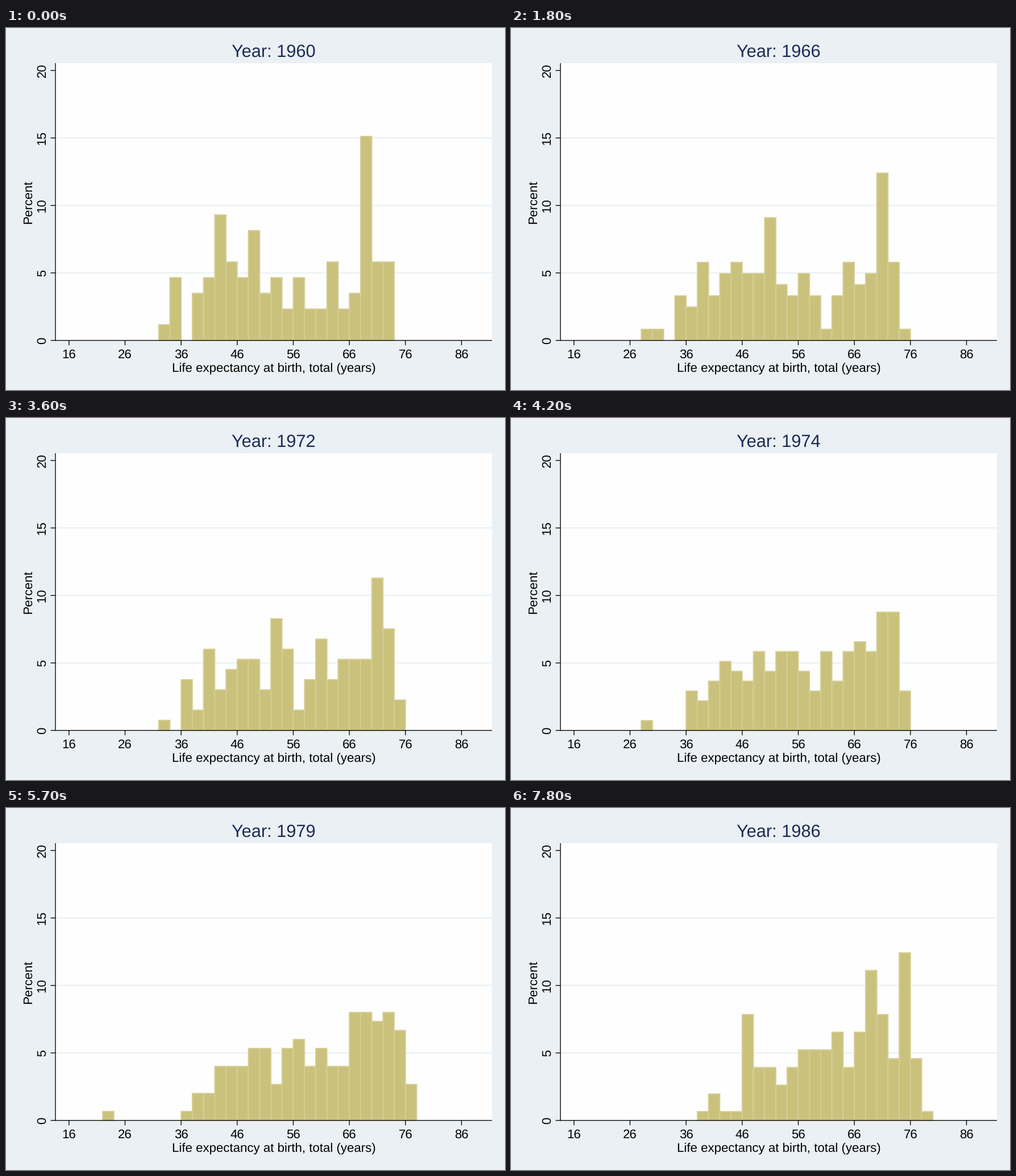
Animation, 878 px wide and 638 px high, one loop 8 s. Source, as a matplotlib script:

```python
import numpy as np
import matplotlib.pyplot as plt
from matplotlib.animation import FuncAnimation
from matplotlib.patches import Rectangle

WIDTH, HEIGHT, DPI = 878, 638, 64  # a power of two keeps the pixel size exact
PT = 72 / DPI
INTERVAL, FRAMES, FRAMES_PER_YEAR = 100, 80, 3
LEFT, RIGHT, TOP, BASE = 87, 855, 62, 550.6
BG, INK, NAVY = "#eaf0f3", "#000000", "#1c2b56"
KHAKI, KHAKI_EDGE = "#cac27c", "#d5cf97"
BINS = np.arange(18, 80, 2)

plt.rcParams["font.family"] = "Liberation Sans"
plt.rcParams["text.hinting"] = "none"


def x_of(age):
    return 110.8 + 9.867 * (age - 16)


def y_of(percent):
    return BASE - 23.79 * percent


def counts_from(first_age, *counts):
    """Number of countries per two-year bin, starting at first_age."""
    row = np.zeros(len(BINS))
    start = (first_age - BINS[0]) // 2
    row[start:start + len(counts)] = counts
    return row


surveys = {}
surveys[1960] = counts_from(32, 1, 4, 0, 3, 4, 8, 5, 4, 7, 3, 4, 2, 4, 2, 2,
                            5, 2, 3, 13, 5, 5)
surveys[1963] = counts_from(28, 1, 1, 1, 5, 2, 6, 5, 7, 6, 8, 7, 6, 3, 5, 1,
                            4, 3, 3, 8, 1, 12, 10, 5)
surveys[1966] = counts_from(28, 1, 1, 0, 4, 3, 7, 4, 6, 7, 6, 6, 11, 5, 4, 6,
                            4, 1, 4, 7, 5, 6, 15, 7, 1)
surveys[1972] = counts_from(36, 5, 2, 8, 4, 6, 7, 7, 4, 11, 8, 2, 5, 9, 5, 7,
                            7, 7, 15, 10, 3)
surveys[1976] = counts_from(36, 2, 4, 2, 10, 6, 3, 9, 8, 4, 8, 11, 4, 7, 5, 8,
                            11, 9, 10, 15, 5, 1)
surveys[1982] = counts_from(38, 2, 4, 3, 5, 8, 6, 8, 3, 9, 7, 9, 10, 7, 4, 12,
                            15, 12, 10, 14, 6)
surveys[1986] = counts_from(38, 1, 3, 1, 1, 12, 6, 6, 4, 6, 8, 8, 8, 10, 6, 10,
                            17, 12, 7, 19, 7, 1)


def percents(year):
    years = list(surveys)
    table = np.array(list(surveys.values()))
    counts = np.round([np.interp(year, years, column) for column in table.T])
    if 1970 <= year <= 1981:  # one country falls far behind, then recovers
        age = np.interp(year, [1970, 1974, 1976, 1977, 1978, 1981],
                        [37, 29, 21, 19, 19, 33])
        counts[int(age - BINS[0]) // 2] += 1
    return 100 * counts / counts.sum()


fig = plt.figure(figsize=(WIDTH / DPI, HEIGHT / DPI), dpi=DPI, facecolor=BG)
ax = fig.add_axes([0, 0, 1, 1])
ax.set_xlim(0, WIDTH)
ax.set_ylim(HEIGHT, 0)
ax.axis("off")


def line(x0, y0, x1, y1, color=INK, width=1.35, zorder=4):
    ax.plot([x0, x1], [y0, y1], color=color, lw=width * PT, zorder=zorder,
            solid_capstyle="butt", snap=False)


def label(x, y, text, size=22.2, color=INK, rotation=0):
    return ax.text(x, y, text, fontsize=size * PT, color=color, ha="center",
                   va="baseline", rotation=rotation, rotation_mode="anchor")


ax.add_patch(Rectangle((LEFT, TOP), RIGHT - LEFT, BASE - TOP, fc="#fefefe",
                       lw=0, zorder=1))
for percent in (5, 10, 15):
    line(LEFT, y_of(percent), RIGHT, y_of(percent), BG, 2, 2)

bars = [Rectangle((x_of(age), BASE), x_of(2) - x_of(0), 0, fc=KHAKI,
                  ec=KHAKI_EDGE, lw=1.9 * PT, zorder=3, snap=False)
        for age in BINS]
for bar in bars:
    ax.add_patch(bar)

line(LEFT, TOP, LEFT, BASE + 0.7)
line(LEFT - 0.7, BASE, RIGHT, BASE)
for percent in range(0, 25, 5):
    line(LEFT - 8.5, y_of(percent), LEFT, y_of(percent))
    label(69.5, y_of(percent), str(percent), rotation=90)
for age in range(16, 96, 10):
    line(x_of(age), BASE, x_of(age), BASE + 8.5)
    label(x_of(age), 581.8, str(age))

CENTER = (LEFT + RIGHT) / 2
label(CENTER, 606, "Life expectancy at birth, total (years)")
label(44.8, (TOP + BASE) / 2, "Percent", rotation=90)
title = label(CENTER, 51, "", 30.8, NAVY)


def update(frame):
    year = 1960 + frame // FRAMES_PER_YEAR
    title.set_text(f"Year: {year}")
    for bar, percent in zip(bars, percents(year)):
        bar.set_y(y_of(percent))
        bar.set_height(BASE - y_of(percent))
        bar.set_visible(percent > 0)
    return [title, *bars]


anim = FuncAnimation(fig, update, frames=FRAMES, interval=INTERVAL,
                     repeat=True, repeat_delay=0, blit=False)
plt.show()
```
